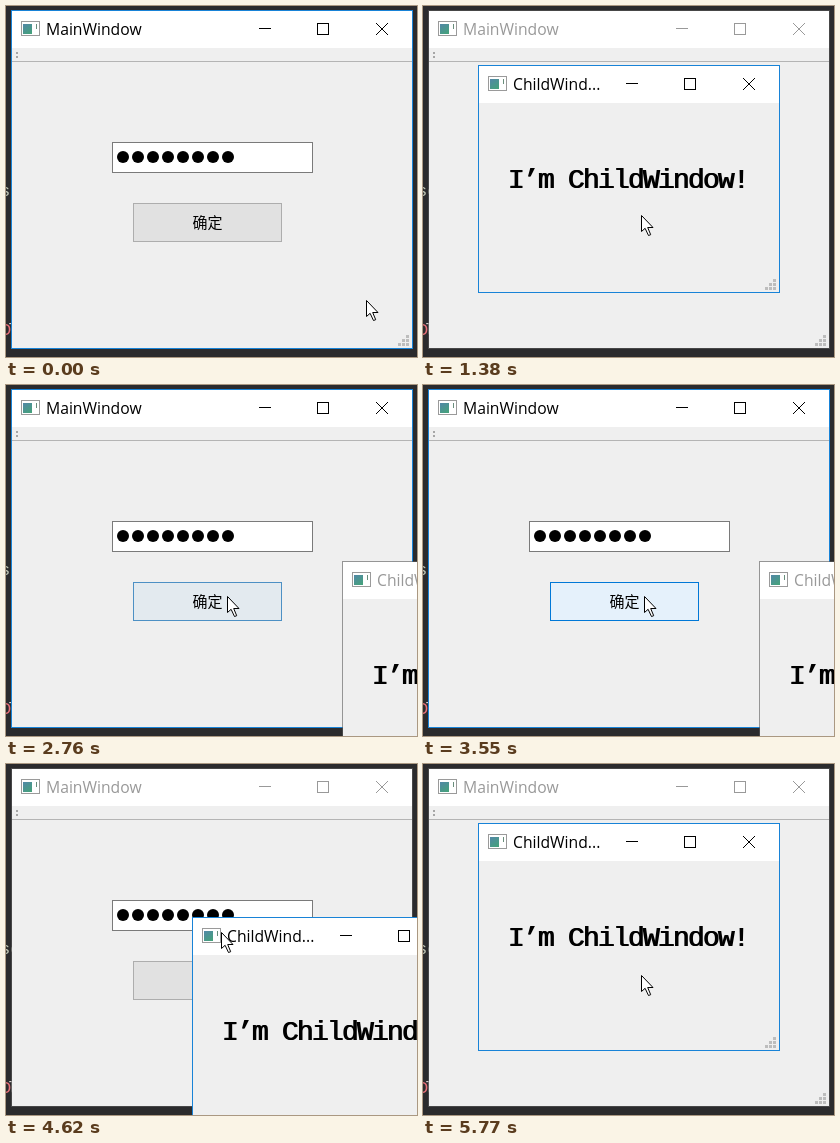
Recreate the animation shown at these times as an HTML page with a canvas. Size 411 by 351 pixels, loop 6.05 s.

```html
<!DOCTYPE html>
<html>
<head>
<meta charset="utf-8">
<style>
html, body { margin: 0; width: 100%; height: 100%; overflow: hidden; background: #2b2b2d; }
canvas { display: block; }
</style>
</head>
<body>
<canvas id="stage" width="411" height="351"></canvas>
<script>
const ctx = document.getElementById('stage').getContext('2d');
const LOOP = 6050;
const TITLE_FONT = '15.7px "Open Sans", "Noto Sans", sans-serif';
const LABEL_FONT = '28px "Liberation Mono", monospace';
const CODE_FONT = '17px "Liberation Mono", monospace';

// Pointer gestures: start, end, and where the tip comes to rest
const home = { x: 360, y: 294 };
const gestures = [
  { from: 160, to: 870, x: 220, y: 234 },
  { from: 870, to: 1050, x: 219, y: 211 },
  { from: 1350, to: 1720, x: 166, y: 87 },
  { from: 1820, to: 2020, x: 185, y: 99 },
  { from: 2020, to: 2400, x: 447, y: 204 },
  { from: 2440, to: 2690, x: 221, y: 211 },
  { from: 3810, to: 4270, x: 365, y: 191 },
  { from: 4410, to: 4770, x: 126, y: 154 },
  { from: 4810, to: 5050, x: 384, y: 159 },
  { from: 5250, to: 5640, x: 218, y: 211 }
];

const clamp = v => Math.max(0, Math.min(1, v));
const ease = u => u * u * (3 - 2 * u);
const between = (t, a, b) => t >= a && t < b;
const fadeInOut = (t, a, b, ms) => Math.min(clamp((t - a) / ms), clamp((b - t) / ms));

function pointerAt(t) {
  let { x, y } = home;
  for (const g of gestures) {
    const u = ease(clamp((t - g.from) / (g.to - g.from)));
    x += (g.x - x) * u;
    y += (g.y - y) * u;
  }
  return { x: Math.round(x), y: Math.round(y) };
}

const mix = (a, b, u) => `rgb(${a.map((c, i) => Math.round(c + (b[i] - c) * u))})`;

function rect(x, y, w, h, color) {
  ctx.fillStyle = color;
  ctx.fillRect(x, y, w, h);
}

function frame(x, y, w, h, color) {
  ctx.strokeStyle = color;
  ctx.lineWidth = 1;
  ctx.strokeRect(x + 0.5, y + 0.5, w - 1, h - 1);
}

function text(str, x, y, font, color) {
  ctx.font = font;
  ctx.fillStyle = color;
  ctx.fillText(str, x, y);
}

function windowIcon(x, y) {
  rect(x, y, 19, 15, '#fff');
  frame(x, y, 19, 15, '#9a9a9a');
  const g = ctx.createLinearGradient(x, y, x + 9, y + 13);
  g.addColorStop(0, '#5680b4');
  g.addColorStop(1, '#45a17c');
  rect(x + 2, y + 3, 9, 10, g);
  rect(x + 15, y + 3, 1, 5, '#698e7c');
}

function drawWindow(x, y, w, h, title, active, closeColor) {
  const r = x + w, ink = active ? '#000' : '#999';
  rect(x + 1, y + 1, w - 2, 37, '#fff');
  rect(x + 1, y + 38, w - 2, h - 39, '#efefef');
  frame(x, y, w, h, active ? '#1883d7' : 'rgba(90,90,90,.6)');
  windowIcon(x + 10, y + 11);
  text(title, x + 35, y + 25, TITLE_FONT, ink);

  rect(r - 154, y + 18, 12, 1, ink);
  frame(r - 96, y + 13, 12, 12, ink);
  if (closeColor) rect(r - 59, y + 1, 58, 36, closeColor);
  ctx.strokeStyle = closeColor ? '#fff' : ink;
  ctx.beginPath();
  ctx.moveTo(r - 37, y + 13); ctx.lineTo(r - 25, y + 25);
  ctx.moveTo(r - 25, y + 13); ctx.lineTo(r - 37, y + 25);
  ctx.stroke();

  for (let row = 0; row < 3; row++)
    for (let col = 0; col <= row; col++)
      rect(r - 7 - col * 4, y + h - 14 + row * 4, 3, 3, '#bdbdbd');
}

function drawBackdrop() {
  rect(0, 0, 411, 351, '#2b2b2d');
  text('se', -6, 190, CODE_FONT, '#c4c9b8');
  text('D', -5, 329, CODE_FONT, '#e87078');
  text('l', 1, 329, CODE_FONT, '#d8d0d0');
}

function drawButton(t) {
  const hover = Math.max(fadeInOut(t, 820, 1210, 230), fadeInOut(t, 2650, 4050, 200),
    clamp((t - 5540) / 130));
  const pressed = between(t, 3040, 3190) || between(t, 3320, 3550);
  rect(127, 197, 149, 39, pressed ? '#cce4f7' : mix([225, 225, 225], [229, 241, 251], hover));
  frame(127, 197, 149, 39, pressed ? '#005499' : mix([173, 173, 173], [0, 120, 215], hover));
  ctx.textAlign = 'center';
  text('确定', 201.5, 222, '15px "Noto Sans CJK SC", "Noto Sans CJK", sans-serif', '#000');
  ctx.textAlign = 'left';
}

function drawMain(t, active) {
  drawWindow(5, 4, 402, 339, 'MainWindow', active);
  rect(6, 55, 400, 1, '#b4b4b4');
  for (const y of [46, 50]) rect(10, y, 2, 2, '#a6a6a6');

  rect(106, 136, 201, 31, '#fff');
  frame(106, 136, 201, 31, '#7a7a7a');
  ctx.fillStyle = '#000';
  for (let i = 0; i < 8; i++) {
    ctx.beginPath();
    ctx.arc(117 + i * 15, 151, 6, 0, 7);
    ctx.fill();
  }
  drawButton(t);
}

function drawChild({ x, y }, active, shown, closeColor) {
  const scale = 0.9 + 0.1 * shown;
  ctx.save();
  ctx.globalAlpha = shown;
  ctx.translate(x + 151, y + 114);
  ctx.scale(scale, scale);
  ctx.translate(-151, -114);
  drawWindow(0, 0, 302, 228, 'ChildWind...', active, closeColor);
  // Two passes one pixel apart thicken only the upright strokes
  ctx.letterSpacing = '-1.8px';
  for (const dx of [0, 1]) text('I’m ChildWindow!', 29.5 + dx, 123, LABEL_FONT, '#000');
  ctx.restore();
}

function drawPointer({ x, y }) {
  ctx.save();
  ctx.translate(x + 0.5, y + 0.5);
  const arrow = new Path2D('M0 0V16L3.6 12.8L7 20L9.2 19.2L6.2 12H11.5Z');
  ctx.fillStyle = '#fff';
  ctx.fill(arrow);
  ctx.strokeStyle = '#000';
  ctx.stroke(arrow);
  ctx.restore();
}

// The child follows the pointer while its title bar is dragged
function childPosition(t) {
  if (t >= 5600) t = 0;
  const second = t >= 4410;
  const grab = second ? { x: 29, y: 15 } : { x: 111, y: 28 };
  const p = pointerAt(second ? Math.min(t, 4770) : Math.max(1820, Math.min(t, 2400)));
  return { x: p.x - grab.x, y: p.y - grab.y };
}

function draw(t) {
  const shown = Math.max(fadeInOut(t, 1170, 5370, 125), clamp((t - 5670) / 95));
  const childActive = between(t, 1200, 2690) || between(t, 4290, 5240) || t >= 5690;
  const closeColor = between(t, 5080, 5370) ? '#f1707a' : between(t, 5010, 5080) ? '#e81123' : '';

  drawBackdrop();
  drawMain(t, !childActive);
  if (shown > 0) drawChild(childPosition(t), childActive, shown, closeColor);
  drawPointer(pointerAt(t));
}

const start = performance.now();
function tick() {
  draw((performance.now() - start) % LOOP);
  requestAnimationFrame(tick);
}
tick();
</script>
</body>
</html>
```
